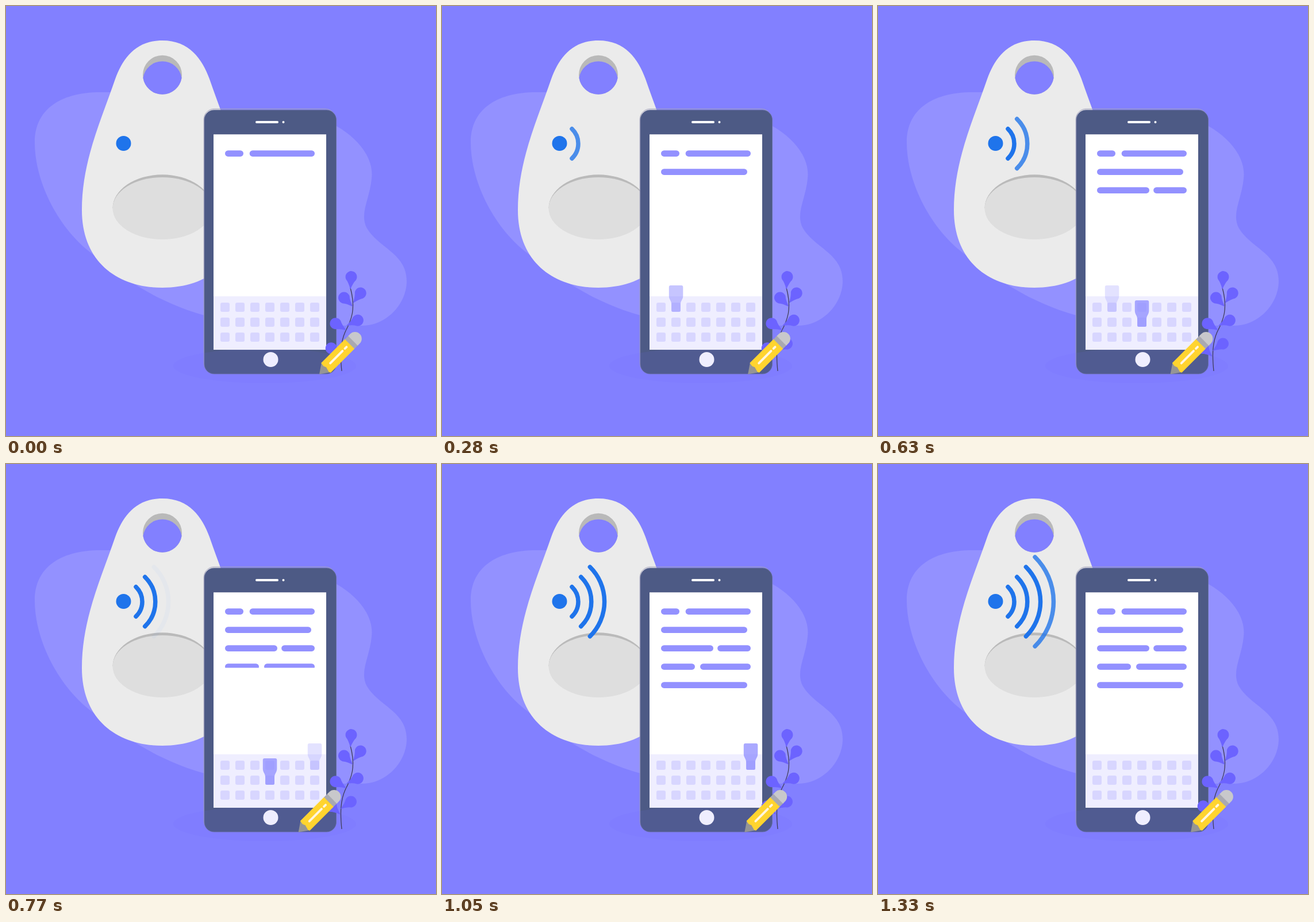
These frames come from a looping animation (748x748 px, 1.4 s). An HTML page:

```html
<!DOCTYPE html>
<html lang="en">
<head>
<meta charset="utf-8">
<title>Tag and phone</title>
<style>
  html, body { margin: 0; height: 100%; overflow: hidden; background: #8280ff; }
  svg { display: block; width: 100vw; height: 100vh; }
</style>
</head>
<body>
<svg viewBox="0 0 748 748">
  <defs>
    <clipPath id="reveal"><rect id="revealBox" x="361" y="223" width="196" height="40"/></clipPath>
    <path id="leaf" d="M0 0Q12 4 17 8.7A10 10 0 1 0 17 -8.7Q12 -4 0 0Z"/>
    <path id="pop" d="M3 0H21.5Q24.5 0 24.5 3V18C24.5 25 20.2 26 20.2 33V43.5Q20.2 46 17.7 46H6.8Q4.3 46 4.3 43.5V33C4.3 26 0 25 0 18V3Q0 0 3 0Z"/>
  </defs>

  <path fill="#9391ff" d="M165 150C92 150 50 182 50 237C50 312 98 398 160 438C215 483 278 520 345 538
    C440 558 545 556 620 556C660 556 697 520 697 478C697 430 646 420 627 385C615 360 633 335 636 300
    C640 268 617 233 575 209L365 200L200 150Z"/>

  <g id="tag">
    <path fill="#ebebeb" d="M272 60C225 60 203 92 190 127C165 200 132 270 132 355C132 444 193 490 272 490
      C351 490 412 444 412 355C412 270 379 200 354 127C341 92 319 60 272 60Z"/>
    <circle cx="272" cy="119.7" r="34" fill="#b9b9b9"/>
    <path fill="#8280ff" d="M238.4 125A34 34 0 0 1 305.6 125A34 34 0 0 1 238.4 125Z"/>
    <path fill="#bababa" d="M185.5 352A86.5 58.7 0 0 1 358.5 352Z"/>
    <ellipse cx="272" cy="352" rx="86.5" ry="54" fill="#dedede"/>
    <circle cx="204.5" cy="239" r="13" fill="#1f74eb"/>
    <g id="waves" fill="none" stroke="#1f74eb" stroke-width="7.5" stroke-linecap="round"/>
  </g>

  <g id="phone">
    <rect x="344.2" y="179" width="229" height="460" rx="18" fill="none" stroke="#a3a3bd"/>
    <rect x="345" y="181" width="229.5" height="459" rx="17" fill="#4d5a85" stroke="#68709a" stroke-width=".8"/>
    <ellipse cx="450" cy="626" rx="159" ry="30" fill="#6c63ff" opacity=".1"/>
    <path d="M436 202H472" stroke="#fff" stroke-width="4" stroke-linecap="round"/>
    <circle cx="482.5" cy="202" r="2" fill="#fff"/>
    <rect x="361" y="223.3" width="196" height="374.5" fill="#fff"/>
    <rect x="361" y="505" width="196" height="92.8" fill="#efeeff"/>
    <circle cx="460.5" cy="615" r="13" fill="#efeeff"/>
    <g id="lines" fill="#9391ff" clip-path="url(#reveal)"/>
    <g id="keys" fill="#d8d6ff"/>
    <g id="pops" fill="#8e8cff"/>
  </g>

  <g id="plant" fill="#6c63ff">
    <path fill="none" stroke="#3f3d56" stroke-width="1.3" d="M584 635C581 606 582 585 590 567C601 546 609 527 599 490"/>
  </g>

  <g id="pencil">
    <g transform="rotate(-45)">
      <path fill="#959595" d="M0 0L17 -11.5V12Z"/>
      <path fill="#ffd42f" d="M16 -11.5H75V12H16L14.5 9L17 0L15 -5Z"/>
      <path fill="#a9a9b1" d="M74.5 -11.5H83V12H74.5Z"/>
      <path fill="#c8c8cb" d="M82.5 -11.5H87.5A11.75 11.75 0 0 1 87.5 12H82.5Z"/>
      <path stroke="#fff6e0" stroke-width="4" stroke-linecap="round" d="M27 0H57M63 0H67"/>
    </g>
  </g>
</svg>

<script>
  const LOOP = 1400, STEP = 70;
  const KEY_X = 373, KEY_Y = 516, PITCH = 26;
  const $ = id => document.getElementById(id);
  const clamp = v => Math.max(0, Math.min(1, v));

  function add(parent, tag, attrs) {
    const el = document.createElementNS("http://www.w3.org/2000/svg", tag);
    for (const name in attrs) el.setAttribute(name, attrs[name]);
    return $(parent).appendChild(el);
  }

  // Each signal arc is taller and deeper than the one before
  const waves = [0, 1, 2, 3].map(i => {
    const x = 226 + 15.7 * i, half = 25.7 + 17.3 * i, bulge = 11 + 7.1 * i;
    const r = (half * half + bulge * bulge) / (2 * bulge);
    return add("waves", "path", { d: `M${x} ${239.5 - half}A${r} ${r} 0 0 1 ${x} ${239.5 + half}` });
  });

  // A row is one long bar, or a first word, a gap that narrows with it, and the rest
  const bar = (x, end, row) =>
    add("lines", "rect", { x, y: 251.3 + 32 * row, width: end - x, height: 10.6, rx: 5.3 });
  [32, 0, 91, 59, 0].forEach((word, row) => {
    if (!word) return bar(381, 531, row);
    bar(381, 381 + word, row);
    bar(393.6 + 0.94 * word, 537, row);
  });

  for (let row = 0; row < 3; row++)
    for (let col = 0; col < 7; col++)
      add("keys", "rect", { x: KEY_X + PITCH * col, y: KEY_Y + PITCH * row, width: 16, height: 16, rx: 3 });

  // Pressed keys by column and row
  const pops = [[1, 0], [3, 1], [6, 0]].map(([col, row]) =>
    add("pops", "use", { href: "#pop", x: KEY_X - 4.2 + PITCH * col, y: KEY_Y - 30 + PITCH * row }));

  // Leaf pairs grow from three nodes of the stem, right and left
  const leaf = (x, y, angle) =>
    add("plant", "use", { href: "#leaf", transform: `translate(${x} ${y}) rotate(${angle})` });
  leaf(599, 493, -86);
  [[603.5, 520, -53, -135], [592, 560, -25, -148], [582, 605, -35, -138]].forEach(([x, y, right, left], i) => {
    leaf(x, y - 3 - i, right);
    leaf(x, y + 3 + i, left);
  });

  function draw(t) {
    const swing = (1 - Math.cos(2 * Math.PI * t / LOOP)) / 2;
    $("pencil").setAttribute("transform", `translate(${545 - 37.3 * swing} 640.5)`);
    waves.forEach((el, i) => el.setAttribute("opacity", clamp((t - 60 - 350 * i) / 280)));
    pops.forEach((el, i) => el.setAttribute("opacity", clamp(1 - Math.abs(t - 420 - 280 * i) / 280)));
    $("revealBox").setAttribute("height", 39 + 0.1135 * t + 0.0000085 * t * t);
  }

  const start = performance.now();
  function tick() {
    const t = (performance.now() - start) % LOOP;
    draw(Math.floor(t / STEP) * STEP);
    requestAnimationFrame(tick);
  }
  tick();
</script>
</body>
</html>
```
